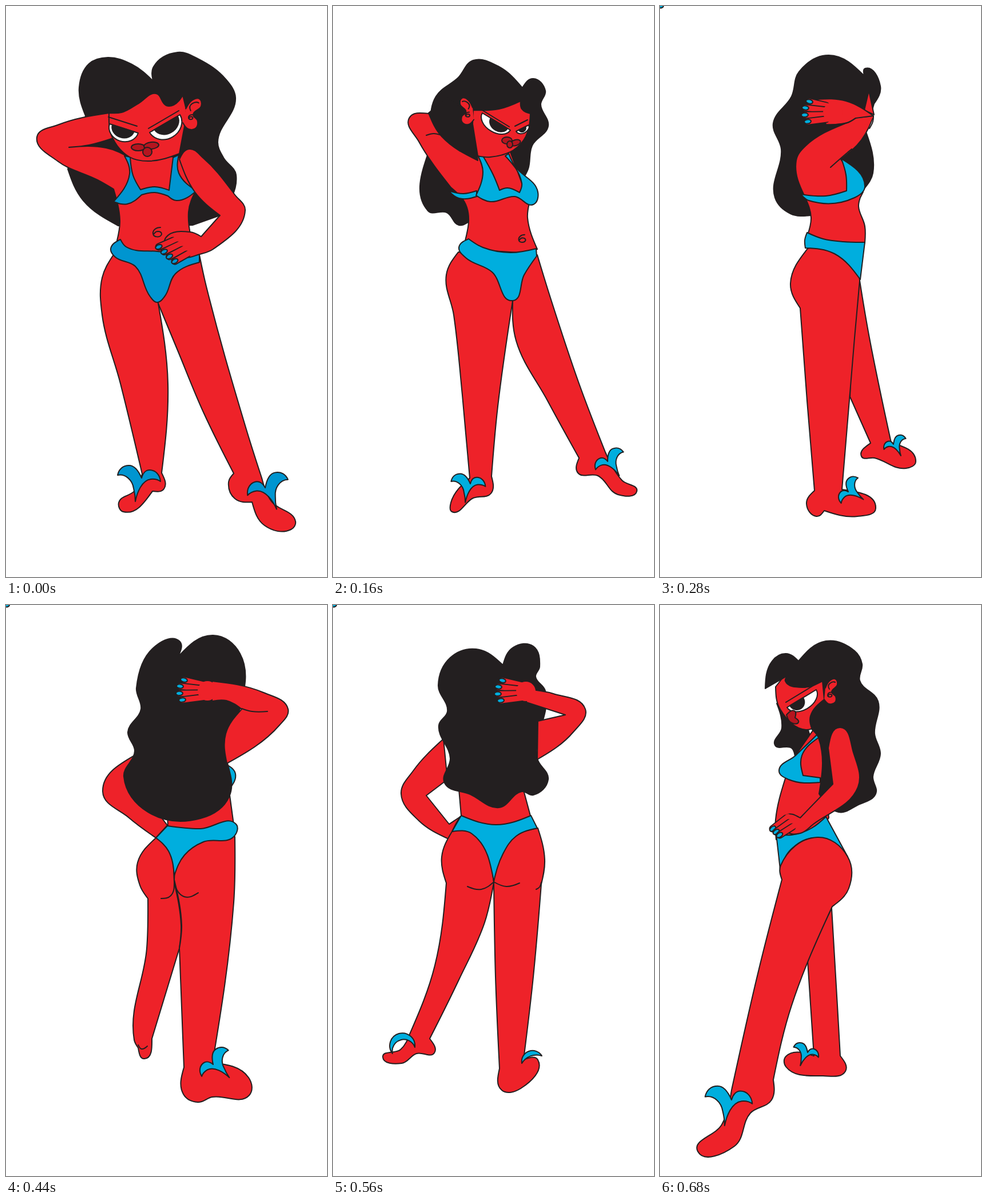
Write an HTML page that moves like this. It is 561 by 998 pixels and loops after 0.8 s.

```html
<!DOCTYPE html>
<html lang="en">
<head>
<meta charset="utf-8">
<title>Turning figure</title>
<style>
html, body { margin: 0; width: 100%; height: 100%; overflow: hidden; background: #fff; }
svg { display: block; width: 100vw; height: 100vh; }
path, ellipse { stroke: #231f20; stroke-width: 2; stroke-linejoin: round; stroke-linecap: round; vector-effect: non-scaling-stroke; }
</style>
</head>
<body>
<svg id="stage" viewBox="0 0 561 998"></svg>
<script>
const INK = "#231f20", RED = "#ee2229", LIP = "#b5151f", BLUE = "#0095d0", SKY = "#00aede";

// Points are "x,y"; a trailing "!" marks a sharp corner, all others are smooth.
const parse = text => text.split(" ").map(token => {
  const [x, y] = token.split(",").map(parseFloat);
  return { x, y, hard: token.endsWith("!") };
});
const mix = (a, b, k) => ({ x: a.x + (b.x - a.x) * k, y: a.y + (b.y - a.y) * k });
const dist = (a, b) => Math.hypot(b.x - a.x, b.y - a.y) || 1;
const xy = p => p.x.toFixed(1) + " " + p.y.toFixed(1);

// Bezier handle of p towards "to", along the bisecting tangent.
function handle(from, p, to) {
  const a = dist(from, p), b = dist(p, to);
  const dx = (p.x - from.x) / a + (to.x - p.x) / b;
  const dy = (p.y - from.y) / a + (to.y - p.y) / b;
  const k = b * 0.36 / (Math.hypot(dx, dy) || 1);
  return { x: p.x + dx * k, y: p.y + dy * k };
}

function curve(text, closed) {
  const pts = parse(text), n = pts.length;
  if (!closed) pts[0].hard = pts[n - 1].hard = true;
  const at = i => pts[(i + n) % n];
  let d = "M" + xy(pts[0]);
  for (let i = 0; i < (closed ? n : n - 1); i++) {
    const p = at(i), q = at(i + 1);
    let c = p.hard ? null : handle(at(i - 1), p, q);
    let e = q.hard ? null : handle(at(i + 2), q, p);
    c = c || mix(p, e || q, 0.5);
    e = e || mix(q, c, 0.5);
    d += `C${xy(c)} ${xy(e)} ${xy(q)}`;
  }
  return d + (closed ? "Z" : "");
}

const path = (d, fill = "none", more = "") => `<path d="${d}" fill="${fill}" ${more}/>`;
const shape = fill => text => path(curve(text, true), fill);
const hair = shape(INK), skin = shape(RED), suit = shape("currentColor");
const line = text => path(curve(text, false));
const oval = (x, y, rx, ry, turn, fill, more = "") =>
  `<ellipse rx="${rx}" ry="${ry}" transform="translate(${x} ${y}) rotate(${turn})" fill="${fill}" ${more}/>`;
const place = (x, y, turn, size, flip, art) =>
  `<g transform="translate(${x} ${y}) rotate(${turn}) scale(${size * flip} ${size})">${art}</g>`;

const curl = (x, y, size) =>
  place(x, y, 0, size, 1, path("M5-9C-3-9-9-4-8 2C-7 9 5 9 7 3C7-3-3-4-6 2"));

// Two leaves meeting at the ankle, with one stem running down the foot.
const sandal = (x, y, turn, size, flip) => place(x, y, turn, size, flip,
  path("M0 0C-6-14-14-22-22-22C-33-22-40-15-42-5C-28-8-16 4-14 18Q-11 30-11 41C-8 26 0 4 16 2Q26 1 33 6C32-6 24-14 14-14C7-14 2-8 0 0Z", "currentColor"));

const crescent = (a, b, outer, inner, big) =>
  path(`M${a}A${outer} ${outer} 0 ${big} 1 ${b}A${inner} ${inner} 0 0 0 ${a}Z`, "currentColor");

const ear = (x, y, turn, size, flip) => place(x, y, turn, size, flip,
  path(curve("-2,10 7,18 17,15 18,5 11,-3 21,-16 17,-26 8,-23 0,-10", false), RED) +
  path("M7-8Q3-14 8-18T17-20")) + curl(x + 8 * size * flip, y + 2 * size, 0.5);

// Half-ellipse hanging from the lid a-b, the iris between fractions i0 and i1, and the brow above.
function eye(a, b, depth, i0, i1, lift) {
  const p = { x: a[0], y: a[1] }, q = { x: b[0], y: b[1] };
  const turn = Math.atan2(q.y - p.y, q.x - p.x) * 180 / Math.PI;
  const bowl = (s, e, deep, fill) =>
    path(`M${xy(s)}A${dist(s, e) / 2} ${deep} ${turn} 0 0 ${xy(e)}Z`, fill);
  const up = k => ({ x: mix(p, q, k).x - 2, y: mix(p, q, k).y - lift });
  return bowl(p, q, depth, "#fff") + bowl(mix(p, q, i0), mix(p, q, i1), depth * 0.72, INK) +
    path(`M${xy(up(0))}L${xy(up(1))}`);
}

// n fingers from a row of knuckles to a bowed row of tips, each with a painted nail.
function fan(n, tipA, tipB, baseA, baseB, bow = 0) {
  let art = "";
  for (let i = 0; i < n; i++) {
    const t = n > 1 ? i / (n - 1) : 0;
    const between = (a, b) => mix({ x: a[0], y: a[1] }, { x: b[0], y: b[1] }, t);
    const base = between(baseA, baseB);
    let tip = between(tipA, tipB);
    tip = mix(base, tip, 1 + bow * Math.sin(Math.PI * t) / dist(base, tip));
    const inner = mix(tip, base, 1 + 5 / dist(tip, base));
    const turn = Math.atan2(tip.y - base.y, tip.x - base.x) * 180 / Math.PI;
    const stroke = (end, color, w) =>
      path(`M${xy(tip)}L${xy(end)}`, "none", `style="stroke:${color};stroke-width:${w}"`);
    art += stroke(base, INK, 13) + stroke(inner, RED, 9.5) +
      oval(tip.x, tip.y, 6, 3.6, turn, "currentColor");
  }
  return art;
}

const backHand = (x, y, thumb) =>
  fan(1, [x + thumb, y + 34], [], [x + 8, y + 14], []) +
  fan(4, [x - 37, y - 19], [x - 40, y + 16], [x - 8, y - 12], [x - 8, y + 12], 7) +
  oval(x + 4, y, 17, 17, 0, RED, 'style="stroke:none"');

const poses = [];
const pose = (hold, color, ...parts) => poses.push({ hold, art: `<g color="${color}">${parts.join("")}</g>` });

pose(160, BLUE,
  hair("139,192! 128,142 145,101 178,90 220,102 257,131! 258,106 300,81 335,92 385,129 401,160 370,238 380,265 402,295 374,366! 326,383! 196,384! 135,340 108,285!"),
  skin("266,520! 300,602 345,710 398,817! 389,832 400,861 430,867! 452,908 498,915 506,901 464,866 447,825! 420,740 350,490 338,435! 265,450!"),
  skin("187,436! 168,475 168,540 200,660 238,818! 225,847 197,868 205,884 256,848! 276,844 272,816! 283,660 266,520! 250,450! 215,432!"),
  sandal(237, 825, 0, 1, 1), sandal(453, 842, -13, 1, -1),
  skin("180,187! 90,208 54,229 90,271 160,304 188,320! 199,375 194,410! 200,425! 335,440! 319,360 332,322! 304,265! 215,255!"),
  hair("110,247! 145,243 187,231! 214,264! 175,248"),
  suit("200,408! 183,424 190,438 226,455 252,508 264,518 277,508 296,468 338,448! 338,434! 265,429 210,421"),
  suit("207,262! 216,293 188,342! 212,346 237,330! 260,326 283,332! 298,340 333,323! 302,292 302,260! 292,265! 285,322! 260,316 235,321! 222,296 217,264!"),
  skin("180,187! 186,230 216,264 250,271 303,258! 312,210! 315,181! 309,156! 293,173 280,174 262,153 232,170 202,186"),
  ear(313, 192, 6, 1.25, 1),
  eye([181, 206], [231, 222], 23, 0.1, 0.85, 12), eye([251, 221], [304, 190], 27, 0.16, 0.92, 7),
  oval(231, 247, 12, 6, 0, LIP), oval(254, 244, 13, 6, -6, LIP), oval(247, 255, 8, 8, 0, LIP),
  curl(265, 396, 1),
  skin("303,268! 320,250 345,266 400,330 418,357 362,425 338,434 310,440 280,425 280,404 322,395 341,403! 374,366! 330,325"),
  fan(4, [267, 421], [295, 446], [292, 410], [316, 434])
);

pose(120, SKY,
  hair("167,255! 166,358 199,361 220,383 236,378! 330,305! 341,285 348,244 376,210 363,172 371,148 350,127 331,143! 290,106 245,95 219,125 180,158 170,203!"),
  skin("314,515! 320,585 375,690 430,790! 428,816 463,821 498,854 531,848 505,829 476,780! 430,660 380,510 357,435! 320,440!"),
  skin("219,430! 198,470 211,540 226,680 239,825! 206,868 208,884 245,860 276,852 277,822! 288,700 314,515! 300,440!"),
  sandal(240, 835, 0, 0.8, 1), sandal(480, 796, -24, 0.76, -1),
  skin("167,188! 133,196 150,237 206,317! 234,352 231,410! 232,425! 340,432! 357,425! 340,370 343,345! 310,255! 253,255!"),
  hair("167,187! 190,228 253,270! 245,190! 200,160!"),
  line("163,226 176,223 190,226"),
  suit("237,407! 220,422 232,440 278,465 314,515 334,470 356,437! 355,424! 310,431 262,422"),
  suit("202,323! 228,328 251,323! 251,333! 220,336"),
  suit("254,263! 262,290 250,331! 275,342 318,333 350,347 358,325 318,280 307,258! 301,262! 330,310 326,326! 305,318 291,322! 280,295 262,262!"),
  skin("245,182! 290,180 328,166! 330,180 345,188! 337,228 315,252 275,264 253,262! 244,206!"),
  ear(244, 188, 0, 1.05, -1),
  eye([261, 187], [310, 217], 19, 0.3, 0.9, 6), eye([320, 219], [342, 208], 9, 0.2, 0.75, 9),
  oval(304, 235, 9, 6, 0, LIP), oval(319, 239, 9, 5, -18, LIP), oval(309, 242, 5, 6, 0, LIP),
  curl(331, 407, 0.8)
);

pose(160, SKY,
  hair("263,366! 228,363 201,335 212,250 198,205 230,158 243,115 295,86 357,122! 359,109 385,140 374,171! 360,220! 372,292 358,318! 300,340!"),
  skin("365,148! 374,190! 357,182!"),
  skin("349,480! 366,580 404,763! 447,796 430,808 375,790 352,787 368,764! 332,683! 335,600!"),
  sandal(408, 766, -18, 0.56, -1),
  skin("258,424! 228,485 245,528! 257,690 270,847! 256,870 273,892 287,882! 345,892 377,878 318,845! 340,580 349,480! 345,440! 290,415!"),
  sandal(329, 849, -48, 0.7, -1),
  skin("254,335! 238,270 255,244 322,206! 342,196! 373,193! 352,234 316,268! 355,325! 350,335! 347,350 358,385 358,414! 285,411! 258,400! 264,370"),
  line("298,282 315,267 335,250"),
  suit("257,396! 253,409 254,423! 305,433 350,478! 358,413! 320,412 285,407"),
  suit("317,267! 358,316 340,335 260,340 246,329! 290,332 326,323! 325,295"),
  skin("275,163! 325,166 373,192! 342,196! 327,204 290,207!"),
  skin("373,193! 364,208! 330,205! 342,197!").replace("/>", ' style="stroke:none"/>'),
  line("373,192 372,202 366,214"), line("342,196 328,204 308,207"),
  backHand(298, 186, -9)
);

pose(120, SKY,
  skin("226,262! 169,326 215,372 262,407! 282,385! 265,363! 240,340!"),
  skin("282,362! 283,390! 320,397! 398,384! 390,325!"),
  skin("262,407! 230,450 234,490 248,513! 246,600 224,760 231,774! 242,793 255,758! 303,600! 306,560 294,485! 292,440! 275,400!"),
  line("231,769 237,776 247,771"),
  skin("294,480! 307,560 303,600! 311,808! 310,855 335,869 360,860 425,857 424,826 361,800! 398,520 400,405! 350,400! 296,440!"),
  line("271,513 288,508 294,485"), line("294,488 312,510 336,503"),
  sandal(362, 803, -36, 0.86, -1),
  suit("282,386! 262,407! 284,430 294,473! 312,437 345,414 398,405 402,383 340,391"),
  suit("386,279! 401,295 391,321!"),
  hair("301,90! 303,63 262,71 228,145 236,182 213,222 225,255 206,300 248,362 340,373 390,335 383,235 411,175 409,85 362,53"),
  skin("386,277! 478,210 493,182 450,153 360,133! 360,168! 385,167 412,182! 384,225"),
  line("412,181 430,186 457,186"),
  backHand(348, 150, -7)
);

pose(120, SKY,
  skin("193,234! 140,290 119,330 150,377 202,409! 224,369! 203,383! 163,333! 200,305!"),
  skin("220,322! 224,368! 230,376! 285,388! 346,372! 332,320!"),
  skin("208,396! 190,440 198,486! 178,630 134,750! 118,777 87,790 120,801 146,784 177,783 169,758! 220,655 265,555 281,485! 275,440! 265,410! 240,388!"),
  skin("281,485! 284,650 291,810! 295,848 328,845 358,795 333,795! 350,650 364,488! 370,445 358,390! 310,400! 284,440!"),
  line("235,492 259,497 281,484"), line("281,484 303,492 326,486"), line("364,485 361,493 355,497"),
  crescent([104, 784], [143, 773], 22, 20.3, 1), crescent([330, 801], [365, 788], 19, 30, 0),
  suit("224,368! 208,396! 243,400 281,483! 297,435 320,404 357,390! 346,368! 285,384"),
  line("222,370 215,382 208,396"),
  hair("297,105! 315,74 350,72 361,108 354,125 371,150 357,268 376,305 350,332 330,326 290,354 240,331 195,311 205,268 185,210 200,186 184,140 205,92 250,77"),
  skin("357,270! 420,222 441,182 385,155 338,147! 338,170! 406,192! 358,203!"),
  backHand(333, 151, -20)
);

pose(120, SKY,
  skin("300,530! 310,700 315,788! 324,815 285,823 220,807 220,789 269,788! 258,622! 285,560!"),
  sandal(258, 782, 14, 0.62, 1),
  hair("204,172! 213,215 201,245 230,250 236,264! 262,228! 250,190!"),
  skin("268,218! 236,264! 219,303! 202,375 203,410! 270,410! 295,372! 285,220!"),
  suit("203,400! 210,462! 230,426 272,407 328,440! 290,370! 265,390 230,402"),
  skin("301,527! 230,700 198,830! 195,865 158,888 130,946 66,955 108,908 125,848! 172,640 213,480! 211,455 275,406 328,440 330,495"),
  sandal(125, 865, 0, 1.1, 1),
  suit("277,224! 237,263 208,290 225,305 280,310! 280,302! 250,298! 248,263 277,232!"),
  skin("224,115! 202,143! 210,182 255,218 285,200! 300,150! 284,120!"),
  eye([222, 179], [273, 148], 20, 0.1, 0.55, 9),
  shape(LIP)("221,192! 235,185 236,197! 242,205 230,206"),
  hair("242,98! 290,63 340,80 353,103 349,132 381,168 375,225 385,260 372,300 377,330 345,350 312,362 278,330! 277,232 266,218! 263,194 287,165! 284,133! 250,144 219,133 224,123! 184,146! 196,98 220,85"),
  ear(289, 155, 0, 1, 1),
  skin("294,250! 315,214 338,258 346,318 268,383 245,399 222,396 220,368 245,372! 302,313!"),
  fan(3, [197, 391], [209, 402], [220, 373], [231, 388])
);

const stage = document.getElementById("stage");
const loop = poses.reduce((sum, p) => sum + p.hold, 0);
let shown = -1;

function draw(now) {
  let t = now % loop, i = 0;
  while (t >= poses[i].hold) t -= poses[i++].hold;
  if (i !== shown) stage.innerHTML = poses[shown = i].art;
}

const start = performance.now();
function tick() {
  draw(performance.now() - start);
  requestAnimationFrame(tick);
}
tick();
</script>
</body>
</html>
```
